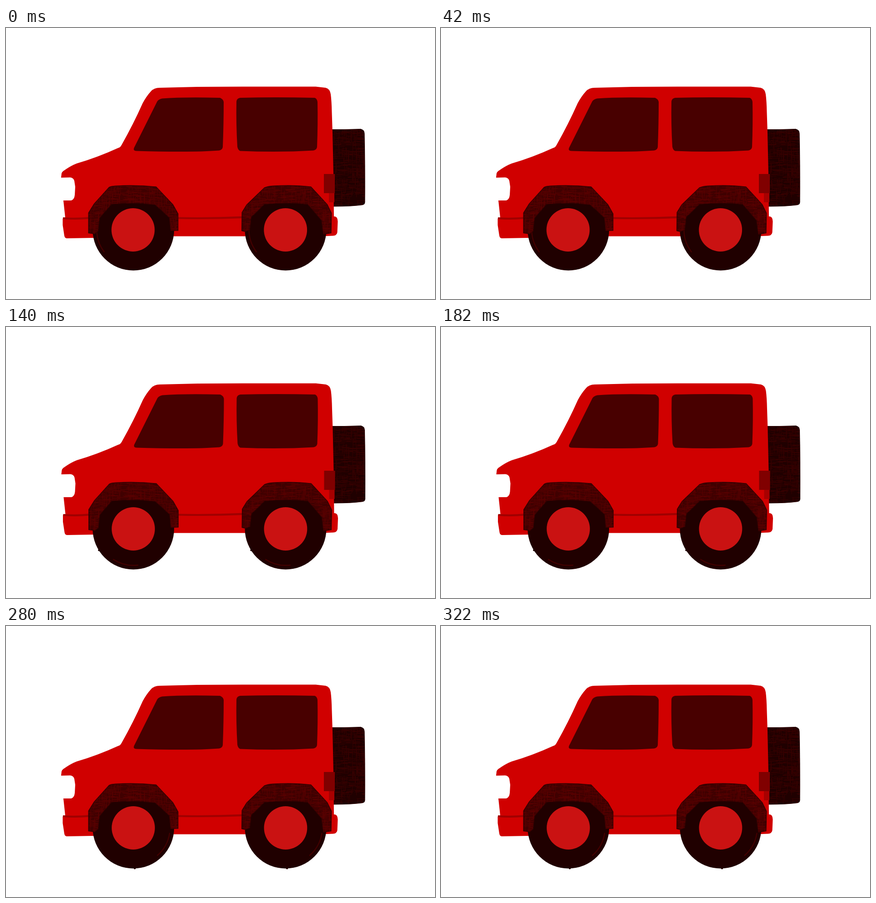
Animation of 942 by 594 pixels, one loop 0.35 s. Source, as an HTML page with a canvas:

```html
<!DOCTYPE html>
<html lang="en">
<head>
<meta charset="utf-8">
<title>Red car</title>
<style>
html, body { margin: 0; width: 100%; height: 100%; overflow: hidden; background: #fff; }
canvas { display: block; }
</style>
</head>
<body>
<canvas id="stage" width="942" height="594"></canvas>
<script>
const ctx = document.getElementById('stage').getContext('2d');
const STEP = 70;

// One row per step: body x, body y, hub x, shine angle, tyre nub angle (degrees)
const poses = [
  [0, 0, 0, 163, 208],
  [0, -2.5, 0, 133, 178],
  [0.5, -5, 0.5, 103, 148],
  [0, -2.5, 1, 68, 118],
  [0, 0, 0.5, 29, 88]
];

const body = new Path2D(`M121 328 L122 319 Q123 315 128 312 Q142 302 155 297 Q200 284 246 263
  Q251 262 254 256 Q280 210 300 165 Q308 150 318 139 Q325 131 337 131 L420 129 L520 128.5 L680 128.5
  L702 131 Q711 133 713 145 Q715 160 715.5 185 L717 230 L719 320 L720 413 Q728 412 728.5 424
  L727.5 448 Q726 456 716 455.5 L690 456.5 H340 L190 460 L134 461 Q129 461 128 455
  L124.5 432 L124.5 418 Q126 415 130 415 L126 378 L143 378 Q150 376 151 366
  L152 348 L150 335 Q148 328 141 327.5 Z`);

const windows = new Path2D(`M281 263 L332 161 Q335 156 343 154.5 Q390 151 470 153 Q477 156 478 162
  Q478 210 476 261 Q475 267 468 268.5 Q410 273 286 269.5 Q279 269 281 263 Z
  M506 161 Q507 154 514 153 Q590 151 678 153 Q683 155 684 162 Q685 210 683 261
  Q682 267 675 268.5 Q600 273 514 269.5 Q509 267 508 260 Q505 210 506 161 Z`);

const spare = new Path2D(`M712 222 L742 222 L779 221 Q787 223 787.5 231 Q789 300 788.5 382
  Q788 388 780 388.5 Q755 392 712 391.5 Z`);

const frontArch = new Path2D(`M180.5 450 L180.5 405 L193 385 L226 348.5 Q230 346 240 345.5 Q285 342.5 330 347.5
  L367 386.5 L378.5 407 L378.5 444.5 L361 445 L358 416 L327 388 Q280 382 232 387
  L206 417 L203 445 L196 452 Z`);

const rearArch = new Path2D(`M517 445 L517.5 404 L528 387 L567 349.5 Q575 346 586 345.5 Q630 342.5 670 347.5
  L706 386.5 L715.5 406 L714.5 450 L696 453 L692 422 L662 387 Q615 382 568 387
  L539 415 L536 443 L525 447 Z`);

const trim = new Path2D(`M125 415 Q155 417 184 414 L184 418.5 Q155 421 125 419 Z
  M376 414.5 Q450 416 522 412.5 L522 417 Q450 420 376 418.5 Z`);

// Loose woven strokes inside a box
function weave(seed, x, y, w, h) {
  const rnd = () => (seed = (seed * 16807) % 2147483647) / 2147483647;
  const path = new Path2D();
  for (let i = 0; i < (w * h) / 28; i++) {
    const px = Math.floor(x + rnd() * w);
    const py = Math.floor(y + rnd() * h);
    const len = 6 + rnd() * 20;
    if (rnd() < 0.68) path.rect(px, py, len, 1);
    else path.rect(px, py, 1, len);
  }
  return path;
}

const fabric = [
  [spare, weave(41, 712, 220, 78, 172), '#200000', 'rgba(130,0,0,.2)'],
  [frontArch, weave(73, 178, 340, 202, 114), '#400000', 'rgba(150,0,0,.25)'],
  [rearArch, weave(97, 514, 340, 202, 114), '#400000', 'rgba(150,0,0,.25)']
];

function fill(path, color) {
  ctx.fillStyle = color;
  ctx.fill(path);
}

function disc(x, y, r, color) {
  ctx.fillStyle = color;
  ctx.beginPath();
  ctx.arc(x, y, r, 0, Math.PI * 2);
  ctx.fill();
}

function cloth([shape, threads, base, thread]) {
  ctx.save();
  ctx.clip(shape);
  fill(shape, base);
  fill(threads, thread);
  ctx.strokeStyle = 'rgba(32,0,0,.6)';
  ctx.lineWidth = 2.5;
  ctx.stroke(shape);
  ctx.restore();
}

function wheel(x, hubX, shine, nub) {
  const rad = Math.PI / 180;
  const y = 442;
  disc(x, y, 89.5, '#200000');
  disc(x + 89 * Math.cos(nub * rad), y + 89 * Math.sin(nub * rad), 2.2, '#200000');
  ctx.strokeStyle = '#420000';
  ctx.lineWidth = 2.5;
  ctx.lineCap = 'round';
  ctx.beginPath();
  ctx.arc(x, y, 80.5, (shine - 20) * rad, (shine + 20) * rad);
  ctx.stroke();
  disc(hubX, 442.5, 47.4, '#ca1212');
}

function onBody(dx, dy, paint) {
  ctx.save();
  ctx.translate(dx, dy);
  paint();
  ctx.restore();
}

function draw(step) {
  const [dx, dy, hub, shine, nub] = poses[step];
  ctx.fillStyle = '#fff';
  ctx.fillRect(0, 0, 942, 594);
  onBody(dx, dy, () => {
    cloth(fabric[0]);
    fill(body, '#d00000');
    fill(windows, '#480000');
    fill(trim, '#a00000');
    ctx.fillStyle = '#a80000';
    ctx.fillRect(709, 361, 12, 21);
    ctx.fillStyle = '#800000';
    ctx.fillRect(698, 320, 24, 42);
  });
  wheel(279.7, 279 + hub, shine, nub);
  wheel(614, 613.7 + hub / 2, shine, nub);
  onBody(dx, dy, () => {
    cloth(fabric[1]);
    cloth(fabric[2]);
  });
}

function tick() {
  draw(Math.floor(performance.now() / STEP) % poses.length);
  requestAnimationFrame(tick);
}
tick();
</script>
</body>
</html>
```
